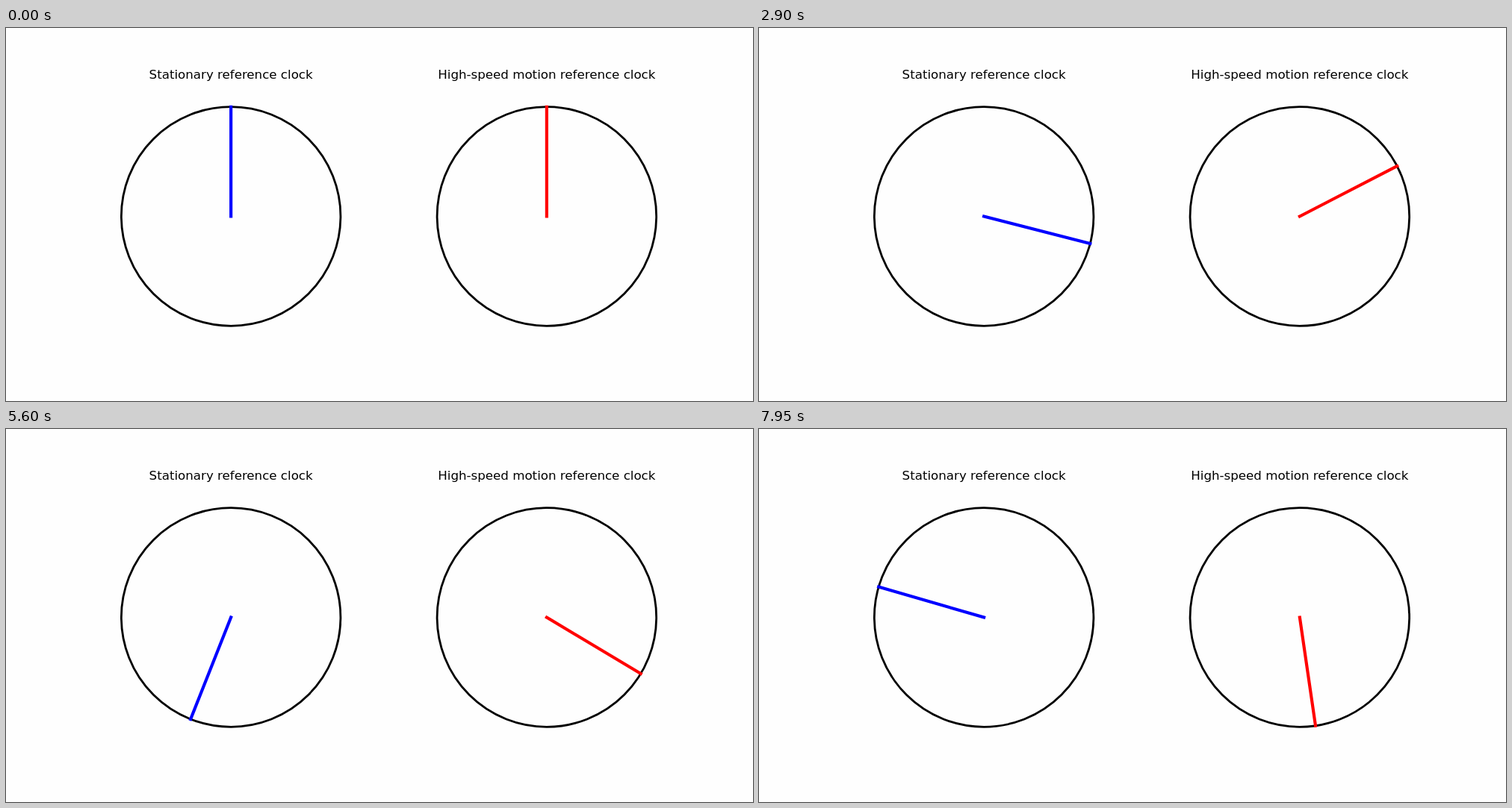
Recreate the animation shown at these times as an HTML page. Size 1000 px wide and 500 px high, loop 8 s.

```html
<!DOCTYPE html>
<html lang="en">
<head>
<meta charset="utf-8">
<title>Two clocks</title>
<style>
  html, body { margin: 0; width: 100%; height: 100%; overflow: hidden; background: #fefefe; }
  svg { display: block; width: 1000px; height: 500px; }
  circle { fill: none; stroke: #000; stroke-width: 2.78; }
  line { stroke-width: 4.17; stroke-linecap: square; }
  text { font: 16.667px "DejaVu Sans", sans-serif; text-anchor: middle; }
</style>
</head>
<body>
<svg viewBox="0 0 1000 500">
  <g transform="translate(301.14 252.5)">
    <text y="-184.5">Stationary reference clock</text>
    <circle r="146.78"/>
    <line id="still" y2="-146.78" stroke="#00f"/>
  </g>
  <g transform="translate(723.86 252.5)">
    <text y="-184.5">High-speed motion reference clock</text>
    <circle r="146.78"/>
    <line id="moving" y2="-146.78" stroke="#f00"/>
  </g>
</svg>
<script>
  const LOOP = 8000, TICK = 50;
  const DEGREES_PER_TICK = 1.8;
  const TIME_DILATION = 0.6;

  const still = document.getElementById("still");
  const moving = document.getElementById("moving");
  const turn = (hand, degrees) => hand.setAttribute("transform", `rotate(${degrees})`);

  function draw() {
    const tick = Math.floor((performance.now() % LOOP) / TICK);
    const angle = tick * DEGREES_PER_TICK;
    turn(still, angle);
    turn(moving, angle * TIME_DILATION);
    requestAnimationFrame(draw);
  }
  draw();
</script>
</body>
</html>
```
